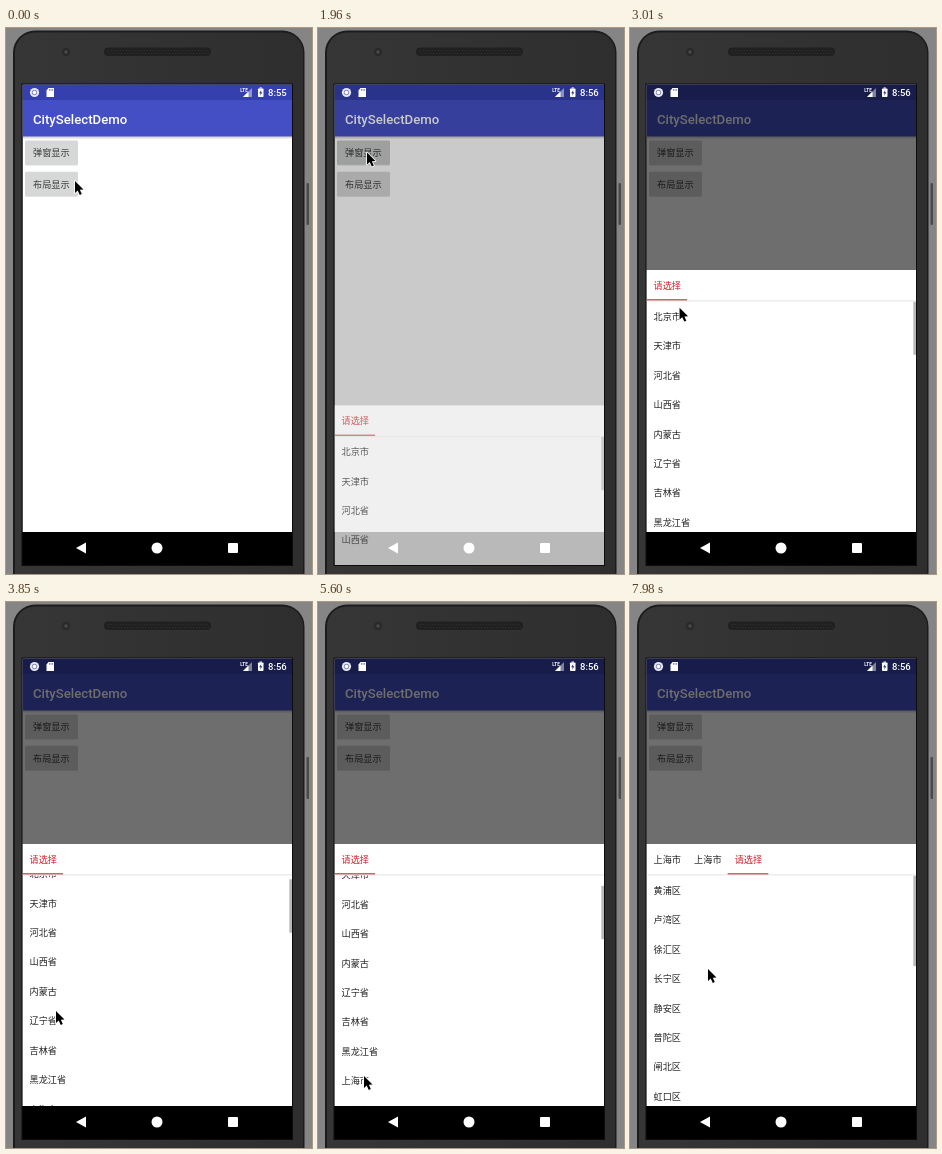
These frames come from a looping animation (306 by 546 pixels, 8 s). An HTML page with a canvas:

```html
<!DOCTYPE html>
<html lang="zh-CN">
<head>
<meta charset="utf-8">
<style>
html, body { margin: 0; width: 100%; height: 100%; overflow: hidden; background: #858585; }
canvas { display: block; width: 306px; height: 546px; }
</style>
</head>
<body>
<canvas></canvas>
<script>
const LOOP = 8000, W = 306, H = 546;
const LEFT = 16.5, TOP = 56.5, WIDTH = 269.5;
const SHEET_TOP = 242, LIST_TOP = 273, NAV_TOP = 504, BOTTOM = 537, ROW = 29.45, TAB = 40.6;
const CLOCK_TICK = 1120, OPEN = 1888, PICK_PROVINCE = 5670, PICK_CITY = 6720;
const CJK = '"Noto Sans CJK SC", "Noto Sans CJK", sans-serif';
const RED = '#c9252d', INK = '#222';
const PROVINCES = '北京市 天津市 河北省 山西省 内蒙古 辽宁省 吉林省 黑龙江省 上海市 江苏省 浙江省'.split(' ');
const DISTRICTS = '黄浦区 卢湾区 徐汇区 长宁区 静安区 普陀区 闸北区 虹口区 杨浦区'.split(' ');

const canvas = document.querySelector('canvas');
const dpr = window.devicePixelRatio || 1;
canvas.width = W * dpr;
canvas.height = H * dpr;
const c = canvas.getContext('2d');
c.scale(dpr, dpr);

const linear = (t, start, end) => Math.min(1, Math.max(0, (t - start) / (end - start)));
const smooth = (t, start, end) => {
  const p = linear(t, start, end);
  return p * p * (3 - 2 * p);
};

// The pointer visits both buttons, the list, then each picked entry.
const START = { x: 69, y: 153 };
const MOVES = [
  { start: 280, end: 630, x: 49, y: 124.5 },
  { start: 2380, end: 3570, x: 50, y: 409 },
  { start: 4970, end: 5460, x: 46, y: 474 },
  { start: 5850, end: 6300, x: 55, y: 290 },
  { start: 7350, end: 7980, x: 78, y: 367 }
];

function pointerAt(t) {
  let { x, y } = START;
  for (const m of MOVES) {
    const p = smooth(t, m.start, m.end);
    x += (m.x - x) * p;
    y += (m.y - y) * p;
  }
  return [x, y];
}

function rect(x, y, w, h, fill) {
  c.fillStyle = fill;
  c.fillRect(x, y, w, h);
}

function band(y, end, fill) {
  rect(LEFT, y, WIDTH, end - y, fill);
}

function round(x, y, w, h, r, fill) {
  c.fillStyle = fill;
  c.beginPath();
  c.roundRect(x, y, w, h, r);
  c.fill();
}

function circle(x, y, r, fill) {
  c.fillStyle = fill;
  c.beginPath();
  c.arc(x, y, r, 0, Math.PI * 2);
  c.fill();
}

function poly(fill, ...pts) {
  c.fillStyle = fill;
  c.beginPath();
  for (let i = 0; i < pts.length; i += 2) c.lineTo(pts[i], pts[i + 1]);
  c.closePath();
  c.fill();
}

function text(s, x, y, fill, font = '9.16px ' + CJK) {
  c.font = font;
  c.fillStyle = fill;
  c.fillText(s, x, y);
}

function clip(top, bottom) {
  c.save();
  c.beginPath();
  c.rect(LEFT, top, WIDTH, bottom - top);
  c.clip();
}

function gradient(x0, y0, x1, y1, from, to) {
  const g = c.createLinearGradient(x0, y0, x1, y1);
  g.addColorStop(0, from);
  g.addColorStop(1, to);
  return g;
}

function phone() {
  rect(0, 0, W, H, '#858585');
  round(7, 2.5, 291.5, 570, 22, '#1c1c1c');
  round(9, 4.5, 288, 570, 20, gradient(9, 0, 297, 0, '#363636', '#2e2e2e'));
  round(300.5, 155, 2.5, 42, 1, '#4a4a4a');
  circle(60, 24, 4, '#292929');
  circle(60, 24, 1.8, '#454b50');
  round(98, 19.5, 107, 8.5, 4, '#202020');
  for (let x = 102; x < 203; x += 3) {
    rect(x, 22, 1, 1, '#303030');
    rect(x + 1, 25, 1, 1, '#303030');
  }
  rect(15.5, 55.5, 271.5, 482.5, '#0c0c0c');
}

function button(label, y, press) {
  round(19, y + .7, 53, 24.3, 1.5, 'rgba(0,0,0,.14)');
  round(19, y, 53, 24.3, 1.5, '#d6d7d7');
  round(19, y, 53, 24.3, 1.5, `rgba(0,0,0,${press})`);
  text(label, 27, y + 15.7, '#3a3a3a');
}

function app(t) {
  band(TOP, NAV_TOP, '#fff');
  band(TOP, 72, '#3540ae');
  band(72, 108.5, '#444fc5');
  band(108.5, 111.5, gradient(0, 108.5, 0, 111.5, 'rgba(0,0,0,.2)', 'rgba(0,0,0,0)'));
  text('CitySelectDemo', 27, 95.5, '#fff', '500 13.2px Roboto, sans-serif');
  const press = smooth(t, 1610, 1750) - smooth(t, 2030, 2300);
  button('弹窗显示', 112.4, press * .07);
  button('布局显示', 143.8, 0);
}

function statusIcons(t) {
  circle(28.5, 64.5, 4.6, '#e8e8f2');
  circle(28.5, 64.5, 2.7, '#8d92bb');
  circle(28.5, 64.5, 1.7, '#fff');
  poly('#fff', 42.5, 60, 48, 60, 48, 69, 40.5, 69, 40.5, 62.5);
  for (let x = 43; x < 47; x += 1.7) rect(x, 61, .7, 1.8, '#555b94');
  text('LTE', 234.3, 63.7, '#fff', '700 4.6px Roboto, sans-serif');
  poly('rgba(255,255,255,.45)', 246, 60, 246, 69, 237, 69);
  poly('#fff', 242.5, 63.5, 242.5, 69, 237, 69);
  round(252, 60.5, 5.5, 8.5, .7, '#fff');
  rect(253.5, 59.5, 2.5, 1, '#fff');
  poly('#30377f', 255.2, 62, 253.2, 65.2, 254.6, 65.2, 254.2, 67.7, 256.4, 64.3, 255, 64.3);
  text(t < CLOCK_TICK ? '8:55' : '8:56', 262, 68, '#fff', '500 9.5px Roboto, sans-serif');
}

function navBar() {
  band(NAV_TOP, BOTTOM, '#000');
  poly('#fff', 70, 520, 80, 514.5, 80, 525.5);
  circle(151, 520, 5.5, '#fff');
  round(222, 515, 10, 10, 1, '#fff');
}

function list(items, count, scroll) {
  const view = NAV_TOP - LIST_TOP, total = count * ROW;
  clip(LIST_TOP + .5, NAV_TOP);
  items.forEach((s, i) => text(s, 23.5, LIST_TOP + 18.7 + i * ROW - scroll, INK));
  if (total > view) rect(283.3, LIST_TOP + .5 + scroll * view / total, 2.7, view * view / total, '#b9b9b9');
  c.restore();
}

function sheet(t) {
  const level = (t >= PICK_PROVINCE) + (t >= PICK_CITY);
  band(SHEET_TOP, NAV_TOP, '#fff');
  for (let i = 0; i <= level; i++)
    text(i < level ? '上海市' : '请选择', 23.5 + i * TAB, 260.5, i < level ? INK : RED);
  band(272.5, 273.3, '#dedede');
  const tab = smooth(t, PICK_PROVINCE, PICK_PROVINCE + 200) + smooth(t, PICK_CITY, PICK_CITY + 200);
  rect(LEFT + tab * TAB, 271.2, TAB, 1.2, '#b9444a');
  if (level === 0) list(PROVINCES, 34, 22 * smooth(t, 3600, 3900 + 70) + 23 * smooth(t, 4130, 4410));
  else if (level === 1) list(['上海市'], 1, 0);
  else list(DISTRICTS, 20, 0);
}

function pointer(x, y) {
  c.save();
  c.translate(x, y);
  c.scale(.85, .85);
  c.beginPath();
  [[0, 0], [0, 14], [3.2, 11.2], [5.6, 16.4], [8, 15.3], [5.7, 10.3], [10, 10]].forEach(p => c.lineTo(...p));
  c.closePath();
  c.lineWidth = 2;
  c.lineJoin = 'round';
  c.strokeStyle = '#fff';
  c.stroke();
  c.fillStyle = '#000';
  c.fill();
  c.restore();
}

function draw(t) {
  phone();
  clip(TOP, BOTTOM);
  app(t);
  band(TOP, NAV_TOP, `rgba(0,0,0,${.57 * linear(t, OPEN, OPEN + 200)})`);
  statusIcons(t);
  navBar();
  // The sheet decelerates upward, over the bar, while fading in.
  if (t > OPEN) {
    const rest = 1 - linear(t, OPEN + 21, OPEN + 206);
    c.save();
    c.globalAlpha = linear(t, OPEN - 30, OPEN + 112);
    c.translate(0, (NAV_TOP - SHEET_TOP) * rest * rest);
    sheet(t);
    c.restore();
  }
  c.restore();
  pointer(...pointerAt(t));
}

function frame() {
  draw(performance.now() % LOOP);
  requestAnimationFrame(frame);
}
frame();
</script>
</body>
</html>
```
